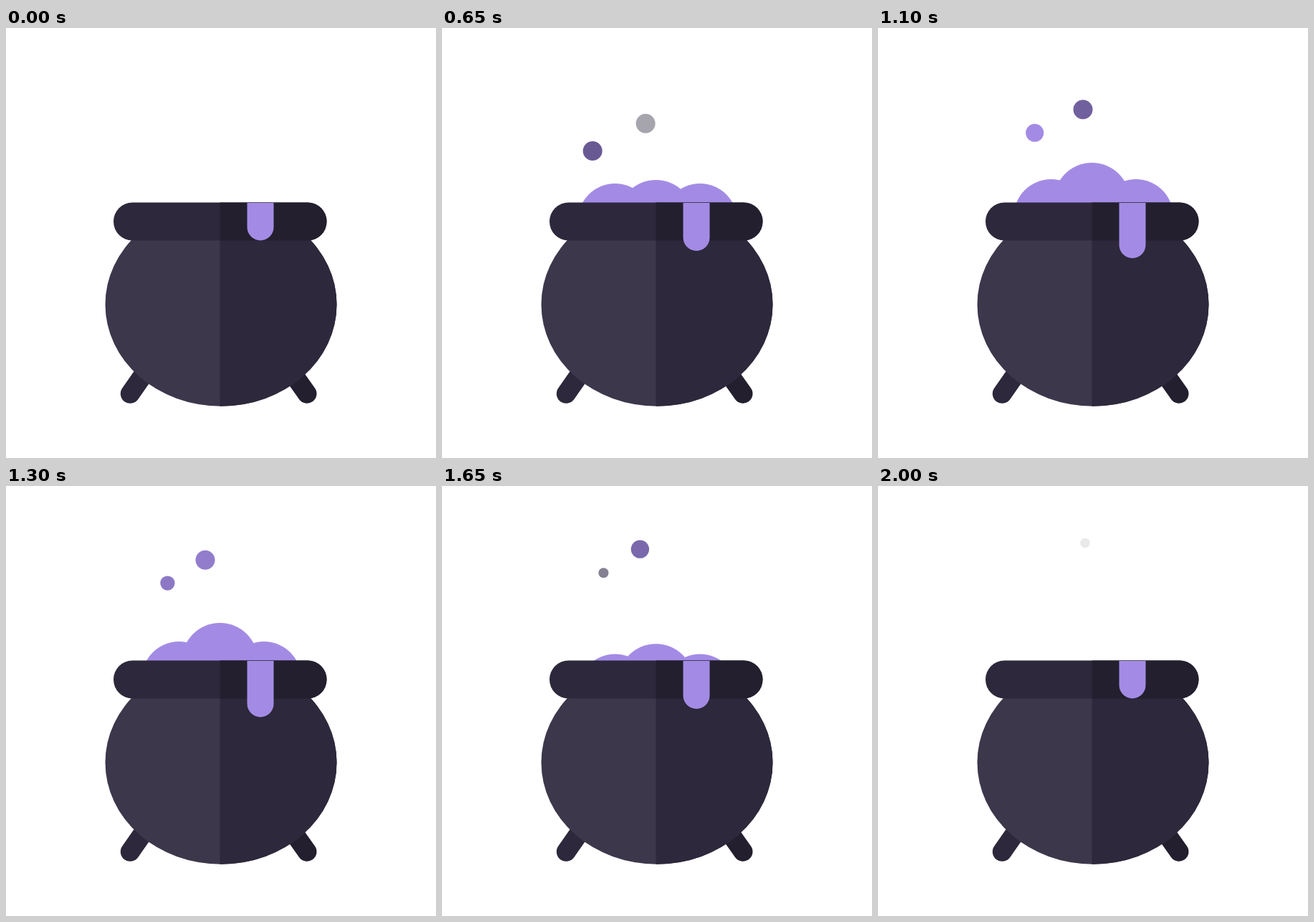
Animation, 600 px wide and 600 px high, one loop 2.05 s. Source, as an HTML page with a canvas:

```html
<!DOCTYPE html>
<html lang="en">
<head>
<meta charset="utf-8">
<title>Bubbling cauldron</title>
<style>
html, body { margin: 0; width: 100%; height: 100%; overflow: hidden; background: #fff; }
canvas { display: block; width: 600px; height: 600px; }
</style>
</head>
<body>
<canvas id="stage" width="600" height="600"></canvas>
<script>
const ctx = document.getElementById('stage').getContext('2d');
const LOOP = 2050, STEP = 50, MID = 298.5, TAU = Math.PI * 2;
const POTION = [163, 139, 229];
const PURPLE = `rgb(${POTION})`;
const LIGHT = '#3c374b', DARK = '#2d283b', DEEP = '#231f2e';

const ramp = (t, a, b) => Math.max(0, Math.min(1, (t - a) / (b - a)));
const mix = (a, b, u) => a + (b - a) * u;

// Gentle ease in and out between times a and b.
function ease(t, a, b) {
  const u = ramp(t, a, b);
  return u - 0.4 * Math.sin(TAU * u) / TAU;
}

// Goes 0 to 1 until `full`, rests, then returns to 0 between `drop` and `end`.
const swell = (t, full, drop, end) => ease(t, 0, full) - ease(t, drop, end);

const bubbles = [
  {
    x: t => 218.7 - 9 * Math.sin(TAU * (t - 350) / 1500),
    y: t => mix(194, 113, ease(t, 0, 1950)),
    r: t => mix(13.5, 7, ramp(t, 1020, 1560)),
    fade: t => ramp(t, 180, 910) - ramp(t, 1210, 1880)
  },
  {
    x: t => 282 + 8 * Math.cos(TAU * (t - 900) / 1200),
    y: t => mix(141, 79.5, ease(t, 350, 1980)),
    r: t => mix(13.5, 6.8, ramp(t, 1600, 2000)),
    fade: t => ramp(t, 430, 1400) - ramp(t, 1525, 2025)
  }
];

function disc(x, y, r) {
  ctx.beginPath();
  ctx.arc(x, y, r, 0, TAU);
  ctx.fill();
}

function leg(x0, y0, x1, y1, color) {
  ctx.strokeStyle = color;
  ctx.lineWidth = 27;
  ctx.lineCap = 'round';
  ctx.beginPath();
  ctx.moveTo(x0, y0);
  ctx.lineTo(x1, y1);
  ctx.stroke();
}

// Fills a path in two tones, split at the middle line.
function halves(path, left, right) {
  ctx.save();
  ctx.fillStyle = left;
  ctx.fill(path);
  ctx.beginPath();
  ctx.rect(MID, 0, 600 - MID, 600);
  ctx.clip();
  ctx.fillStyle = right;
  ctx.fill(path);
  ctx.restore();
}

const body = new Path2D();
body.ellipse(300, 385.8, 161.5, 142, 0, 0, TAU);
const rim = new Path2D();
rim.roundRect(150, 243.5, 297.5, 53, 26.5);

function pot() {
  leg(173.3, 510.3, 193, 482, DARK);
  leg(420, 510.3, 400, 482, DEEP);
  ctx.save();
  ctx.beginPath();
  ctx.rect(0, 296, 600, 304);
  ctx.clip();
  halves(body, LIGHT, DARK);
  ctx.restore();
  halves(rim, DARK, DEEP);
}

function potion(t) {
  const side = mix(249, 210.3, swell(t, 850, 1070, LOOP));
  const mid = mix(249, 186.3, swell(t, 1150, 1200, LOOP));
  ctx.save();
  ctx.beginPath();
  ctx.rect(0, 0, 600, 244);
  ctx.clip();
  ctx.fillStyle = PURPLE;
  disc(241.5, side + 52, 52);
  disc(360, side + 52, 52);
  disc(MID, mid + 53, 53);
  ctx.restore();
}

function drip(t) {
  const length = mix(52.5, 78.5, swell(t, 1200, 1350, 2000));
  ctx.fillStyle = PURPLE;
  ctx.beginPath();
  ctx.roundRect(336.5, 244, 37, length, [0, 0, 18.5, 18.5]);
  ctx.fill();
}

// Faint bubbles are both darker and thinner.
function bubble(b, t) {
  const a = b.fade(t);
  if (a <= 0) return;
  ctx.globalAlpha = Math.min(1, a * 1.8);
  ctx.fillStyle = `rgb(${POTION.map(c => Math.round(c * a))})`;
  disc(b.x(t), b.y(t), b.r(t));
  ctx.globalAlpha = 1;
}

function draw(now) {
  const t = Math.floor((now % LOOP) / STEP) * STEP;
  ctx.fillStyle = '#fff';
  ctx.fillRect(0, 0, 600, 600);
  potion(t);
  pot();
  drip(t);
  bubbles.forEach(b => bubble(b, t));
}

const start = performance.now();
function tick() {
  draw(performance.now() - start);
  requestAnimationFrame(tick);
}
tick();
</script>
</body>
</html>
```
